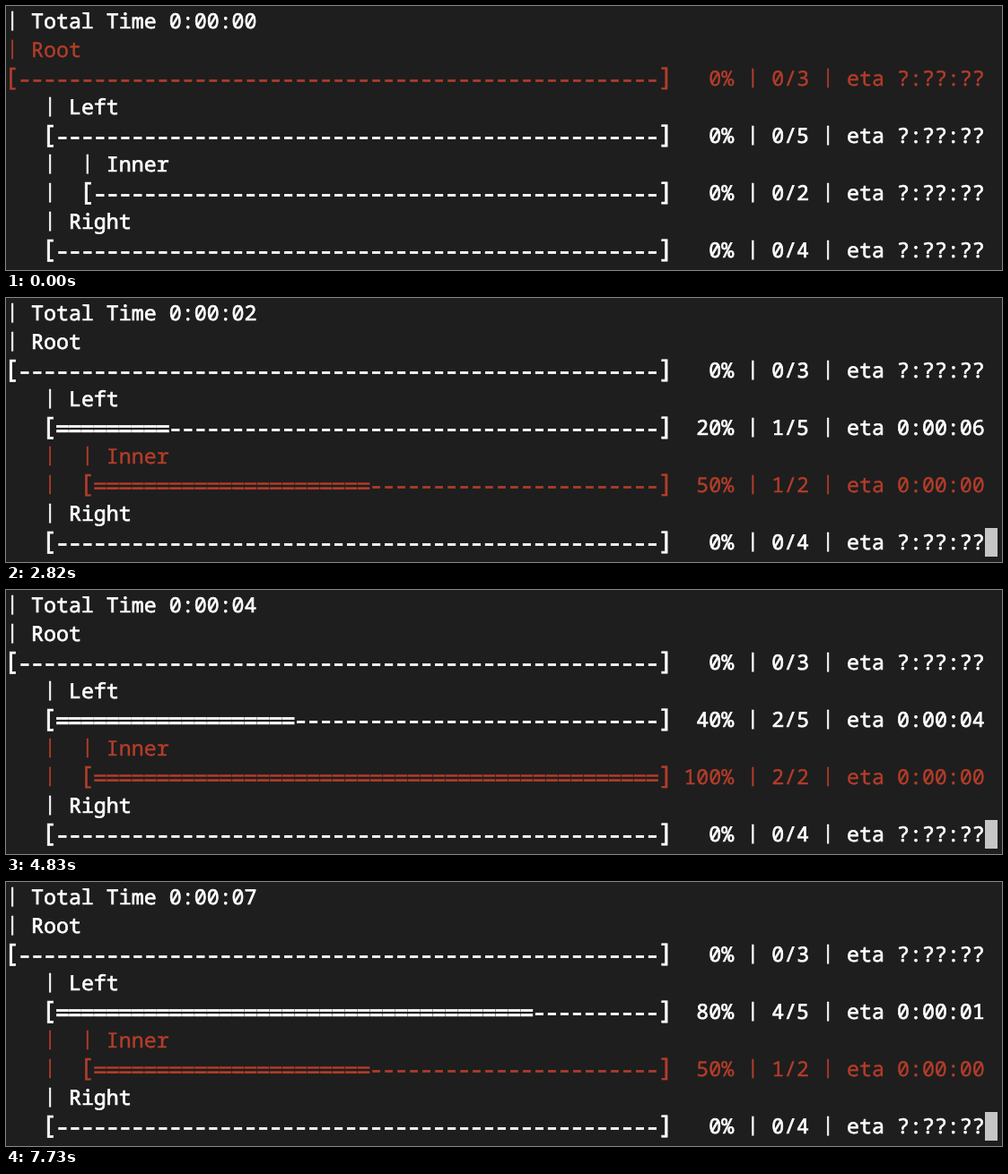
These frames come from a looping animation (1110 by 295 pixels, 8 s). An HTML page:

```html
<!DOCTYPE html>
<html lang="en">
<head>
<meta charset="utf-8">
<title>Nested progress bars</title>
<style>
  html, body { margin: 0; width: 100%; height: 100%; overflow: hidden; background: #1e1e1e; }
  #term {
    position: absolute; left: 0; top: 0; margin: 0;
    font: 500 23.312px/32px "Noto Sans Mono", "DejaVu Sans Mono", monospace;
    font-variant-ligatures: none;
    text-rendering: geometricPrecision;
    white-space: pre; color: #fff;
    -webkit-text-stroke: .7px;
  }
  .row { height: 32px; }
  .on { color: #b43d2a; -webkit-text-stroke-width: .4px; }
  .pipe {
    display: inline-block; position: relative; top: -3.5px;
    width: 13.987px; text-align: center;
    font-size: 21px; line-height: 0;
  }
  /* Larger glyphs kept on the same column grid. */
  .bar { position: relative; left: -1.4px; font-size: 28px; line-height: 0; letter-spacing: -2.813px; }
  .bar span { position: relative; }
  .open { left: -1px; }
  .close { left: 1px; }
  .done { top: 3px; }
  .rest { top: 2px; }
  #cursor { position: absolute; left: 1091px; top: 257px; width: 14px; height: 32px; background: #c6c6c6; }
</style>
</head>
<body>
<div id="term"></div>
<div id="cursor"></div>
<script>
  const LOOP = 8000;
  const BAR_END = 52; // column of the closing bracket
  const UNKNOWN = "?:??:??";
  const steps = [120, 790, 1190, 1680, 1790, 2430, 2820, 3240, 3330, 3960,
                 4380, 4830, 4970, 5560, 6060, 6500, 6620, 7240, 7730];
  const ticks = [1680, 2820, 3240, 4830, 6060, 6500, 7730];
  const leftEta = [null, 6, 4, 3, 1];

  const term = document.getElementById("term");
  const cursor = document.getElementById("cursor");
  const passed = (times, t) => times.filter(x => x <= t).length;
  const clock = s => s == null ? UNKNOWN : "0:00:0" + s;
  const span = (name, text) => `<span class="${name}">${text}</span>`;

  function row(text, on) {
    return `<div class="row${on ? " on" : ""}">${text.replace(/\|/g, span("pipe", "|"))}</div>`;
  }

  function bar(name, titleIndent, barIndent, done, total, eta, on) {
    const width = BAR_END - barIndent.length - 1;
    const fill = Math.floor(width * done / total);
    const percent = (100 * done / total + "%").padStart(4);
    const meter = span("bar", span("open", "[") + span("done", "=".repeat(fill)) +
      span("rest", "-".repeat(width - fill)) + span("close", "]"));
    return row(`${titleIndent}| ${name}`, on) +
      row(`${barIndent}${meter} ${percent} | ${done}/${total} | eta ${clock(eta)}`, on);
  }

  function draw(step, seconds) {
    // Each pass: outer bar advances, then the inner bar runs 0, 1, 2.
    const k = Math.max(0, step - 1);
    const left = Math.floor(k / 4);
    const phase = k % 4;
    const inner = Math.max(0, phase - 1);
    const started = step > 0;
    term.innerHTML =
      row("| Total Time " + clock(seconds)) +
      bar("Root", "", "", 0, 3, null, !started) +
      bar("Left", "   ", "   ", left, 5, leftEta[left], started && phase === 0) +
      bar("Inner", "   |  ", "   |  ", inner, 2, inner ? 0 : null, phase > 0) +
      bar("Right", "   ", "   ", 0, 4, null, false);
    cursor.hidden = !started;
  }

  let shown = "";
  const start = performance.now();
  function frame() {
    const t = (performance.now() - start) % LOOP;
    const step = passed(steps, t);
    const seconds = passed(ticks, t);
    const key = step + ":" + seconds;
    if (key !== shown) {
      draw(step, seconds);
      shown = key;
    }
    requestAnimationFrame(frame);
  }
  frame();
</script>
</body>
</html>
```
